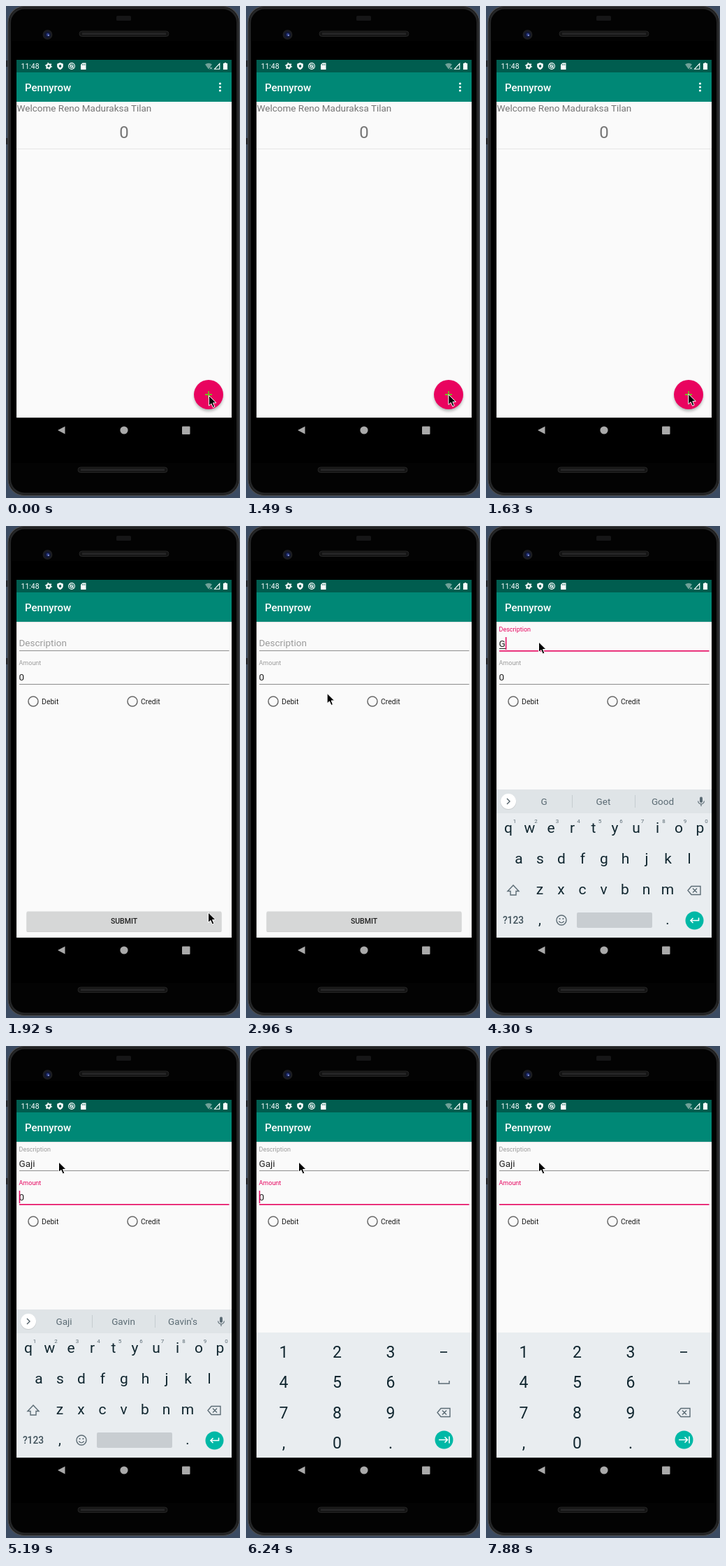
Recreate the animation shown at these times as an HTML page. Size 335 by 704 pixels, loop 8 s.

```html
<!DOCTYPE html>
<html lang="en">
<head>
<meta charset="utf-8">
<title>Phone form demo</title>
<style>
  html, body { margin: 0; width: 100%; height: 100%; overflow: hidden; background: #3b4b62; }
  svg { display: block; width: 100vw; height: 100vh; font-family: Roboto, "Noto Sans", sans-serif; }
</style>
</head>
<body>
<svg id="stage" viewBox="0 0 335 704"></svg>
<script>
const LOOP = 8000;
const PINK = '#e6055f', GREY = '#9b9b9b', LINE = '#8d8d8d', INK = '#212121';
const KEY = '#10262f', SOFT = '#5b6b74', TEAL = '#00b8a6', NAV = '#a9a9a9';
const APP = 'Pennyrow', USER = 'Reno Maduraksa Tilan';

// Markup helpers
const text = (x, y, size, str, fill, extra = '') =>
  `<text x="${x}" y="${y}" font-size="${size}" fill="${fill}" ${extra}>${str}</text>`;
const mid = (x, y, size, str, fill, extra = '') =>
  text(x, y, size, str, fill, `text-anchor="middle" ${extra}`);
const rect = (x, y, w, h, fill, extra = '') =>
  `<rect x="${x}" y="${y}" width="${w}" height="${h}" fill="${fill}" ${extra}/>`;
const disc = (x, y, r, fill, extra = '') =>
  `<circle cx="${x}" cy="${y}" r="${r}" fill="${fill}" ${extra}/>`;
const ring = (x, y, r, color, width) =>
  disc(x, y, r, 'none', `stroke="${color}" stroke-width="${width}"`);
const path = (d, fill, extra = '') => `<path d="${d}" fill="${fill}" ${extra}/>`;
const stroke = (d, color, width) =>
  path(d, 'none', `stroke="${color}" stroke-width="${width}"`);
const group = (id, body) => `<g id="${id}">${body}</g>`;

function phone() {
  const speaker = (x, y) =>
    rect(x, y, 128, 7.5, '#141414', 'rx="3.7" stroke="#2c2c2d" stroke-width=".8"') +
    stroke(`M${x + 4} ${y + 3.7}h120`, '#262627', 3);
  return rect(0, 0, 335, 704, '#3b4b62') +
    rect(0, 78, 4, 9, '#20242b') + rect(0, 189, 4, 9, '#20242b') +
    rect(3, .5, 331, 700, '#030303', 'rx="23" stroke="#4a4b4d" stroke-width="1.4"') +
    rect(5.5, 3, 326, 695, 'none', 'rx="21" stroke="#242526" stroke-width="3"') +
    rect(8, 50, 319, 604, '#000') +
    rect(158, 14, 21, 7, '#161617', 'rx="1.5"') +
    disc(59.5, 41, 7, '#1c1d20') + disc(59.5, 41, 4.5, '#111735') +
    disc(60, 41, 2.2, '#2e3d86') + disc(61, 42, .9, '#a5b2df') +
    speaker(105, 36) + speaker(103, 660);
}

function nav() {
  return path('M74 607L84.500 601.500V612.500Z', NAV) + disc(169, 607, 5.6, NAV) +
    rect(252, 601.5, 11.5, 11.5, NAV, 'rx="1"');
}

function statusIcons() {
  return text(21.5, 90, 10.5, '11:48', '#fff') +
    ring(61, 86, 2.7, '#fff', 2) +
    disc(61, 86, 4.2, 'none', 'stroke="#fff" stroke-width="1.4" stroke-dasharray="1.7 2.7"') +
    path('M77.5 81L81.8 82.7V86Q81.4 89.6 77.5 91.3Q73.6 89.6 73.2 86V82.7Z', '#fff') +
    path('M77.5 83.5l2 2.5-2 2.5-2-2.5Z', '#005d4f') +
    ring(94, 86, 4.4, '#fff', 1.1) + ring(94, 86, 2, '#fff', 1.2) +
    stroke('M91 83l6 6', '#fff', 1) +
    path('M109.5 81.5H114.5V91H107V84Z', '#fff') +
    stroke('M109.5 83v2M111.2 83v2M112.9 83v2', '#005d4f', .7) +
    path('M285 83.5Q290 79.8 295 83.5L290 90.5Z', '#6fa198') +
    stroke('M292 87.5l3 3M295 87.5l-3 3', '#dbe8e5', .9) +
    stroke('M298.5 90.2H305.8V82.5Z', '#fff', 1.1) +
    path('M312.8 81H315.2V82H317V91H311V82H312.8Z', '#fff');
}

// Shared window background with its two bars
function frame() {
  return rect(15, 77, 308, 512, '#fafafa') + rect(15, 77, 308, 18, '#005d4f') +
    rect(15, 95, 308, 42, '#008876') +
    text(27, 122, 15, APP, '#fff', 'font-weight="500"');
}

function home() {
  const dots = [111, 116, 121].map(y => disc(306.5, y, 1.6, '#fff')).join('');
  return frame() + dots +
    text(15.5, 151, 13.5, 'Welcome ' + USER, '#757575') +
    mid(169, 189, 24, '0', '#757575') + rect(15, 204, 308, 1, '#e5e5e5') +
    disc(290, 559, 20.5, '#000', 'opacity=".3" filter="url(#blur)"') +
    disc(290, 556, 21, '#e9035f') +
    stroke('M285 556h10M290 551v10', '#79b81f', 1.8);
}

function form() {
  const radio = (x, label) =>
    ring(x, 251, 7, '#6a6a6a', 1.5) + text(x + 12, 255, 10.5, label, INK);
  const field = (name, y) =>
    rect(19, y, 300.5, 1, LINE, `id="${name}Line"`) +
    rect(18.7, y - 19, 1.5, 18, PINK, `id="${name}Caret"`);
  return frame() + rect(15, 137, 308, 1, '#000', 'opacity=".1"') +
    text(18.5, 172, 13.5, 'Description', GREY, 'id="descLabel"') +
    text(18.5, 199, 9, 'Amount', GREY, 'id="amountLabel"') +
    text(18.5, 173, 13.5, '', INK, 'id="descText"') +
    rect(19, 175, 0, 1, INK, 'id="compose"') +
    text(18.5, 221, 13.5, '0', INK, 'id="amountText"') +
    field('desc', 178) + field('amount', 226) +
    radio(39, 'Debit') + radio(181, 'Credit') +
    rect(29.5, 553, 279, 28, '#000', 'rx="1.5" opacity=".18"') +
    rect(29.5, 551.5, 279, 28.5, '#d6d7d7', 'rx="1.5"') +
    mid(169, 569, 10.5, 'SUBMIT', INK, 'font-weight="500"');
}

const backspace = (x, y) =>
  stroke(`M${x - 9} ${y}l5-6h13v12h-13ZM${x - 2} ${y - 3}l6 6m0-6l-6 6`, SOFT, 1.4);

function letters() {
  const row = (keys, x0, y) =>
    [...keys].map((k, i) => mid(x0 + i * 30.5, y, 21, k, KEY)).join('');
  const hints = [...'1234567890'].map((d, i) => mid(41 + i * 30.5, 424.5, 8, d, SOFT)).join('');
  const words = [83, 168, 253].map((x, i) => mid(x, 399, 13.5, '', SOFT, `id="word${i}"`)).join('');
  return rect(15, 377, 308, 212, '#e9edf0') + rect(15, 377, 308, 34, '#dfe4e7') +
    disc(32, 394.7, 11.3, '#000', 'opacity=".1"') + disc(32, 394, 11, '#fff') +
    stroke('M30 390l4 4-4 4', '#4f5e66', 1.4) +
    group('words', rect(123, 385, 1, 18, '#c5ccd0') + rect(213, 385, 1, 18, '#c5ccd0') + words) +
    rect(306, 387.5, 4, 8.5, SOFT, 'rx="2"') +
    stroke('M303.7 393.5a4.3 4.3 0 0 0 8.6 0M308 398v3', SOFT, 1.2) +
    row('qwertyuiop', 32, 439) + hints + row('asdfghjkl', 47, 483) + row('zxcvbnm', 77, 527) +
    stroke('M39 514l8 8.5h-4v5.5h-8v-5.5h-4Z', SOFT, 1.4) + backspace(298, 521.5) +
    mid(39, 569, 13.8, '?123', '#40525b', 'font-weight="500"') +
    mid(77, 570, 20, ',', KEY) + mid(260, 570, 20, '.', KEY) +
    ring(108, 564, 7, SOFT, 1.4) + disc(105.6, 562, 1.1, SOFT) + disc(110.4, 562, 1.1, SOFT) +
    stroke('M104.3 565.5q3.7 4.5 7.4 0', SOFT, 1.2) +
    rect(130, 553, 108, 22, '#c8cdd1', 'rx="2"') +
    disc(298.5, 564.5, 13, TEAL) +
    stroke('M304.5 560.5v4h-11.5M296.5 561l-3.5 3.5 3.5 3.5', '#fff', 1.6);
}

function digits() {
  const rows = ['123', '456', '789', ',0.'];
  const keys = rows.map((r, j) => [...r].map((k, i) =>
    mid(54 + i * 76.5, 446 + j * 43.4, 23, k, KEY)).join('')).join('');
  return rect(15, 410, 308, 179, '#e9edf0') + keys +
    stroke('M278 438h10', KEY, 1.7) + stroke('M276 479v4h15v-4', SOFT, 1.5) +
    backspace(283, 524.5) + disc(283.5, 563.5, 13, TEAL) +
    stroke('M276 563.5h12M284.5 559.5l4 4-4 4M291 558.5v10', '#fff', 1.6);
}

const stage = document.getElementById('stage');
stage.innerHTML = `<defs>
  <filter id="blur"><feGaussianBlur stdDeviation="2"/></filter>
  <clipPath id="screen"><rect x="15" y="77" width="308" height="544"/></clipPath>
</defs>` + phone() +
  `<g clip-path="url(#screen)">${nav()}${group('home', home())}${group('form', form())}` +
  `${group('letters', letters())}${group('digits', digits())}${statusIcons()}</g>` +
  path('M0 0V14.5L3.4 11.4L5.8 17L8.3 15.9L6 10.4H10.5Z', '#000',
    'id="mouse" stroke="#fff" stroke-width="1"');

const el = {};
stage.querySelectorAll('[id]').forEach(n => el[n.id] = n);
const set = (name, attrs) => {
  for (const k in attrs) el[name].setAttribute(k, attrs[k]);
};
const show = (name, on) => set(name, { display: on ? 'inline' : 'none' });
const clamp = x => Math.max(0, Math.min(1, x));
const ease = x => x * x * (3 - 2 * x);
const mix = (a, b, p) => a + (b - a) * p;

// The screen refreshes only at these moments
const spans = [[900, 1920, 8], [2220, 3260, 8], [3410, 3860, 4], [4150, 4750, 5], [5190, 5340, 2]];
const ticks = [0, 5790, 6240, 6830, 7130, 7430, 7880];
for (const [from, to, n] of spans)
  for (let i = 0; i < n; i++) ticks.push(Math.ceil(mix(from, to, i / (n - 1)) / 10) * 10);

const typing = [
  [4150, 'G', ''], [4300, 'G', 'G Get Good'], [4450, 'Ga', 'Ga Game Gas'],
  [4600, 'Gaj', 'Gaj Gaji Gal'], [4750, 'Gaji', "Gaji Gavin Gavin's"]
];

function underline(name, active) {
  set(name + 'Line', { height: active ? 1.6 : 1, fill: active ? PINK : LINE });
}

function draw(now) {
  const t = Math.max(...ticks.filter(x => x <= now));
  const opening = t >= 1780 && t < 1920;
  show('home', t < 1920);
  show('form', t >= 1780);
  set('home', { transform: `translate(0 ${opening ? -14 : 0})` });
  set('form', { transform: `translate(0 ${opening ? 12 : 0})` });

  // Mouse drifts off the button, then travels to the first field
  const drift = clamp((t - 900) / 1020), trip = ease(clamp((t - 2070) / 1040));
  const x = mix(mix(290.5, 289.5, drift), 75.5, trip);
  const y = mix(mix(557.5, 553, drift ** 2), 166, trip);
  set('mouse', { transform: `translate(${x} ${y})` });

  // Description field
  const inDesc = t >= 3260 && t < 5190, lift = ease(clamp((t - 3260) / 300));
  const [, word, hints] = typing.filter(s => s[0] <= t).pop() || [0, '', ''];
  set('descLabel', { y: mix(172, 151, lift), 'font-size': mix(13.5, 9, lift), fill: inDesc ? PINK : GREY });
  underline('desc', inDesc);
  el.descText.textContent = word;
  const width = word ? el.descText.getComputedTextLength() : 0;
  set('descCaret', { x: 18.7 + width });
  show('descCaret', inDesc && t >= 3410);
  set('compose', { width: inDesc ? width : 0 });

  // Amount field
  const inAmount = t >= 5190, filled = t < 7430;
  const blink = (t >= 5790 && t < 6240) || (t >= 6830 && t < 7130) || t >= 7880;
  set('amountLabel', { fill: inAmount ? PINK : GREY });
  underline('amount', inAmount);
  show('amountText', filled);
  set('amountCaret', { x: t >= 7130 && filled ? 26 : 18.7 });
  show('amountCaret', inAmount && !blink);

  // Keyboards
  const rise = clamp((t - 3560) / 180);
  show('letters', t >= 3560 && t < 5340);
  set('letters', { transform: `translate(0 ${32 * (1 - rise) ** 2})`, opacity: mix(.63, 1, rise) });
  show('words', hints);
  hints.split(' ').forEach((w, i) => el['word' + i].textContent = w);
  show('digits', t >= 5340);
}

function tick() {
  draw(performance.now() % LOOP);
  requestAnimationFrame(tick);
}
tick();
</script>
</body>
</html>
```
